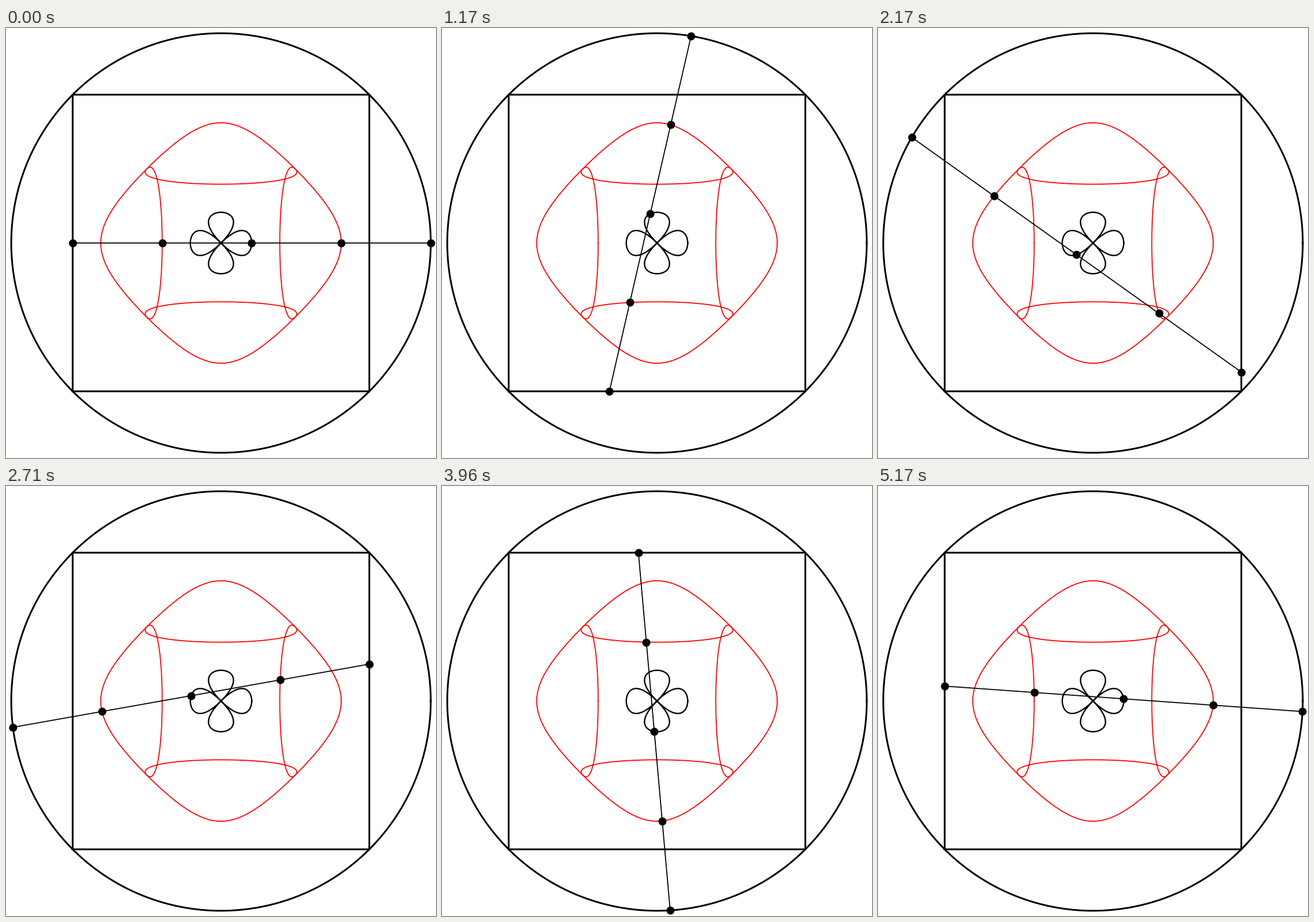
Write a matplotlib script that moves like this. It is 748 px wide and 748 px high and loops after 5210 ms.

```python
import numpy as np
import matplotlib.pyplot as plt
from matplotlib.animation import FuncAnimation

SIZE, DPI = 748, 100
FRAMES, LOOP_MS = 125, 5210
HALF = 258                  # half side of the square
RADIUS = HALF * np.sqrt(2)  # its circumscribed circle
PX = 72 / DPI               # one pixel in points


def on_circle(t):
    return np.array([RADIUS * np.cos(t), RADIUS * np.sin(t)])


def on_square(t):
    """Point opposite the circle point, easing along each side."""
    c, s = np.cos(t), np.sin(t)
    slide = np.sin(2 * t)
    sideways = np.abs(c) >= np.abs(s)
    x = np.where(sideways, -np.sign(c), -np.sign(s) * slide)
    y = np.where(sideways, -np.sign(c) * slide, -np.sign(s))
    return HALF * np.array([x, y])


def between(t, k):
    """Point at fraction k of the way from the square to the circle."""
    return (1 - k) * on_square(t) + k * on_circle(t)


fig = plt.figure(figsize=(SIZE / DPI, SIZE / DPI), dpi=DPI, facecolor="white")
ax = fig.add_axes([0, 0, 1, 1])
ax.set_xlim(-SIZE / 2, SIZE / 2)
ax.set_ylim(-SIZE / 2, SIZE / 2)
ax.axis("off")

turn = np.linspace(0, 2 * np.pi, 1601)
for k, color, width in [(0.25, "red", 1.8), (0.75, "red", 1.8),
                        (0.5, "black", 2.4), (1, "black", 3)]:
    ax.plot(*between(turn, k), color=color, lw=width * PX)
corners = HALF * np.array([[-1, 1, 1, -1, -1], [-1, -1, 1, 1, -1]])
ax.plot(*corners, color="black", lw=3 * PX, solid_joinstyle="miter",
        solid_capstyle="projecting", snap=False)

stops = np.linspace(0, 1, 5)
rod, = ax.plot([], [], color="black", lw=1.8 * PX, marker="o",
               ms=14 * PX, mew=0, snap=False, zorder=5)


def update(i):
    rod.set_data(*between(2 * np.pi * i / FRAMES, stops))
    return rod,


def between(t, k):
    a, b = on_square(t), on_circle(t)
    if np.ndim(t) == 0:
        a, b = a[:, None], b[:, None]
    return (1 - k) * a + k * b


anim = FuncAnimation(fig, update, frames=FRAMES, interval=LOOP_MS / FRAMES,
                     repeat=True, repeat_delay=0)
plt.show()
```
